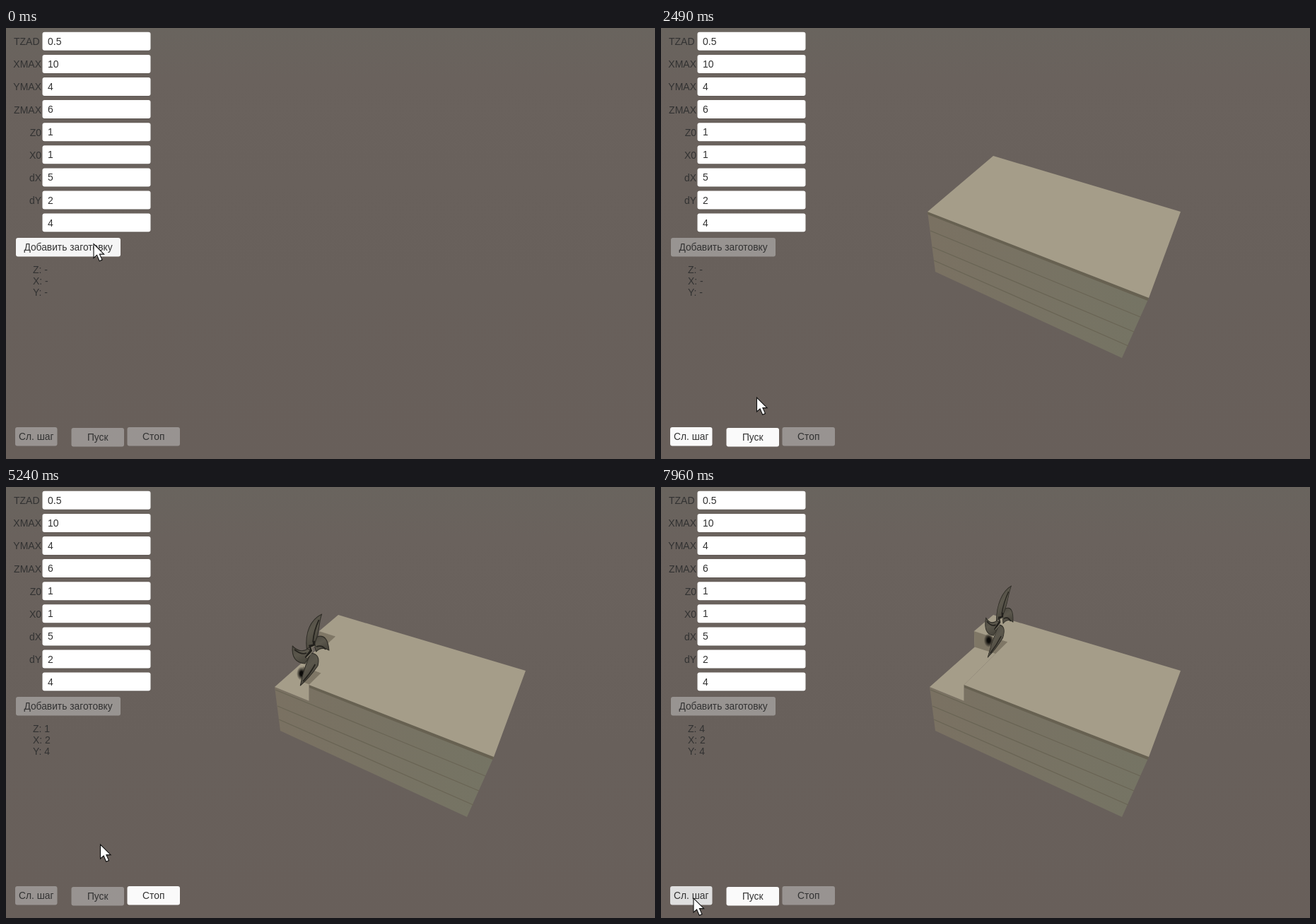
An HTML page that plays this animation: 918x610 px, repeating every 8000 ms.

```html
<!DOCTYPE html>
<html lang="ru">
<head>
<meta charset="utf-8">
<title>Обработка заготовки</title>
<style>
html, body { margin: 0; width: 100%; height: 100%; overflow: hidden; background: #68605b; }
svg { display: block; width: 100vw; height: 100vh; }
text { font: 14px "Liberation Sans", Arial, sans-serif; fill: #323232; }
</style>
</head>
<body>
<svg viewBox="0 0 918 610">
  <defs>
    <linearGradient id="sky" x2="0" y2="1">
      <stop offset="0" stop-color="#69645e"/>
      <stop offset=".12" stop-color="#6a625d"/>
      <stop offset=".6" stop-color="#68605b"/>
      <stop offset="1" stop-color="#685f5a"/>
    </linearGradient>
    <linearGradient id="side">
      <stop offset="0" stop-color="#7a7162"/>
      <stop offset="1" stop-color="#757464"/>
    </linearGradient>
    <linearGradient id="steel" x2=".5" y2="1">
      <stop offset="0" stop-color="#4b4840"/>
      <stop offset=".5" stop-color="#5b574c"/>
      <stop offset="1" stop-color="#48453c"/>
    </linearGradient>
    <radialGradient id="blot">
      <stop offset=".3" stop-color="#0c0b09"/>
      <stop offset="1" stop-color="#0c0b09" stop-opacity="0"/>
    </radialGradient>
  </defs>
  <rect width="918" height="610" fill="url(#sky)"/>
  <g id="block">
    <path id="front" fill="url(#side)"/>
    <path d="M381 287L678 409M384 310L669 430M386 329L661 450" stroke="#696454" stroke-width="1.3"/>
    <path id="strip" fill="#676151"/>
    <path id="floor" fill="#a59d89"/>
    <path id="walls" fill="#7f7766"/>
    <path id="lid" fill="#a59d89"/>
  </g>
  <ellipse id="shade" rx="7" ry="10" fill="url(#blot)"/>
  <g id="cutter" fill="none">
    <g fill="url(#steel)" stroke="#2f2d27" stroke-width="1.1" stroke-linejoin="round">
      <path d="M-6 -2C-9 -25 -2 -43 15 -51C10 -38 13 -24 5 -8Z"/>
      <path d="M5 -8L9 -19Q24 -24 27 0Q16 -6 8 2Z"/>
      <path d="M-4 -2Q-16 5 -27 -6C-28 10 -22 18 -8 19Q-2 10 2 2Z"/>
      <path d="M0 4Q15 5 11 22Q0 38 -14 50Q-11 32 -4 14Z"/>
    </g>
    <path d="M11 -43Q4 -28 3 -12M22 -1Q17 -8 8 -5M-24 -1Q-14 7 -6 4M7 20Q1 32 -10 44" stroke="#25231e" stroke-width="1.8"/>
    <path d="M-7 11L-3 5L1 0L-1 -6L5 -7L4 -13" stroke="#22201c" stroke-width="3.4"/>
    <path d="M-6 11L-1 6L3 1L1 -4L6 -6" stroke="#8a8473" stroke-width="1.2"/>
  </g>
  <g id="panel"></g>
  <path id="cursor" d="M0 0V20L4.6 16L8.2 24.3L12 22.6L8.4 14.6H14.6Z" fill="#fff" stroke="#111" stroke-width="1.1"/>
</svg>
<script>
(() => {
  const LOOP = 8000, ADDED = 1255, RUN = 3205, STOP = 6725, NEXT = 7910;
  const $ = id => document.getElementById(id);
  const set = (id, attrs) => { for (const k in attrs) $(id).setAttribute(k, attrs[k]); };
  const mix = (a, b, k) => a.map((v, i) => v + (b[i] - v) * k);
  const clamp = v => Math.max(0, Math.min(1, v));

  function add(tag, attrs, text = '') {
    const el = document.createElementNS('http://www.w3.org/2000/svg', tag);
    for (const k in attrs) el.setAttribute(k, attrs[k]);
    el.textContent = text;
    return $('panel').appendChild(el);
  }

  // Input fields
  const fields = 'TZAD 0.5,XMAX 10,YMAX 4,ZMAX 6,Z0 1,X0 1,dX 5,dY 2, 4';
  fields.split(',').forEach((field, i) => {
    const [label, value] = field.split(' '), y = 5.8 + 32.1 * i;
    add('rect', { x: 51.5, y: y + .8, width: 153, height: 26, rx: 3, fill: '#4f4945', opacity: .5 });
    add('rect', { x: 51.5, y, width: 153, height: 26, rx: 3, fill: '#fff' });
    add('text', { x: 59, y: y + 18 }, value);
    add('text', { x: i ? 50 : 47.5, y: y + 18.4, 'text-anchor': 'end' }, label);
  });

  const readout = [0, 1, 2].map(i => add('text', { x: 38, y: 347 + 16.2 * i }));

  // Buttons: grey level and opacity of each state, with a short fade between states
  const FADE = 100;
  const tint = { normal: [250, 1], hover: [245, 1], press: [200, 1], off: [200, .5] };

  function button(label, x, y, width, events) {
    const el = add('rect', { x, y, width, height: 26.5, rx: 3 });
    add('text', { x: x + width / 2, y: y + 18, 'text-anchor': 'middle', style: 'font-size:13.8px' }, label);
    return t => {
      const past = events.filter(e => e[0] <= t);
      const [since, now] = past.pop();
      const before = past.length ? past.pop()[1] : now;
      const [grey, alpha] = mix(tint[before], tint[now], clamp((t - since) / FADE));
      el.setAttribute('fill', `rgba(${grey},${grey},${grey},${alpha})`);
    };
  }

  const buttons = [
    button('Добавить заготовку', 14, 297, 148, [[0, 'hover'], [1150, 'press'], [ADDED, 'off']]),
    button('Сл. шаг', 13, 565, 59.5, [[0, 'off'], [ADDED, 'normal'], [RUN, 'off'], [STOP, 'normal'],
      [7650, 'hover'], [7800, 'press'], [NEXT, 'hover']]),
    button('Пуск', 92.5, 566, 74.5, [[0, 'off'], [ADDED, 'normal'], [2900, 'hover'], [3100, 'press'],
      [RUN, 'off'], [STOP, 'normal']]),
    button('Стоп', 171.5, 565, 74.5, [[0, 'off'], [RUN, 'normal'], [6400, 'hover'], [6620, 'press'], [STOP, 'off']])
  ];

  // Pointer moves: begin, end, target
  const moves = [
    [520, 670, 131, 315], [760, 910, 118, 316], [1860, 2150, 135, 495], [2340, 2490, 135.5, 523],
    [2490, 2970, 127, 577], [3300, 3790, 133.5, 506], [5990, 6300, 185, 583], [6300, 6480, 207.5, 573.5],
    [7270, 7700, 46, 582]
  ];
  function pointer(t) {
    return moves.reduce((pos, [begin, end, ...to]) => {
      const k = clamp((t - begin) / (end - begin));
      return mix(pos, to, k * k * (3 - 2 * k));
    }, [124, 305.5]);
  }

  // Perspective map of a 10 x 6 grid onto four corners
  function plane([[x0, y0], [x1, y1], [x2, y2], [x3, y3]]) {
    const ax = x1 - x2, bx = x3 - x2, sx = x0 - x1 + x2 - x3;
    const ay = y1 - y2, by = y3 - y2, sy = y0 - y1 + y2 - y3;
    const den = ax * by - bx * ay;
    const g = (sx * by - bx * sy) / den, h = (ax * sy - sx * ay) / den;
    return (x, z) => {
      const u = x / 10, v = z / 6, w = g * u + h * v + 1;
      return [
        ((x1 - x0 + g * x1) * u + (x3 - x0 + h * x3) * v + x0) / w,
        ((y1 - y0 + g * y1) * u + (y3 - y0 + h * y3) * v + y0) / w
      ];
    };
  }
  const high = plane([[377, 260], [690, 382], [735, 260], [470, 181]]);
  const low = plane([[380, 283], [680, 405], [726, 280], [470, 203]]);
  const poly = pts => 'M' + pts.map(p => p.map(v => v.toFixed(1)).join(' ')).join('L') + 'Z';

  // depths[i] is how far column i has been milled away
  function drawBlock(depths) {
    const n = depths.length, z0 = depths[0];
    const near = high(n, 0), far = high(10, 0);
    const notch = n ? [low(0, 0), low(n, 0)] : [];
    const edge = depths.flatMap((z, i) => [high(i, z), high(i + 1, z)]);
    const wall = (z, i) => poly([high(i, z), high(i + 1, z), low(i + 1, z), low(i, z)]);
    set('front', { d: poly([...notch, near, far, [652, 467], [388, 345]]) });
    set('strip', { d: poly([near, far, [far[0] - 1.6, far[1] + 4], [near[0] + .4, near[1] + 4]]) });
    set('floor', { d: n ? poly([...notch, near, high(n, z0), high(0, z0), low(0, z0)]) : '' });
    set('walls', { d: depths.map(wall).join('') });
    set('lid', { d: poly([far, high(10, 6), high(0, 6), ...edge, near]) });
  }

  function drawCutter(x, z) {
    const col = x - 1, k = z - 1;
    const cx = 405 + 26 * col + 15.8 * k, cy = 222 + 9 * col - 13.3 * k;
    const width = 1 - .04 * col - .078 * k, lean = -.025 * col - .032 * k;
    set('cutter', { transform: `matrix(${width} 0 ${lean} 1 ${cx} ${cy})` });
    set('shade', { transform: `translate(${cx - 13 - k * .6} ${cy + 33 - k * 2.4})` });
  }

  // One step each half second while running, four per column, one more by hand
  function stepCount(t) {
    if (t < RUN) return 0;
    return Math.floor((Math.min(t, STOP - 100) - RUN - 15) / 500) + 1 + (t >= NEXT);
  }

  const show = (id, on) => set(id, { visibility: on ? 'visible' : 'hidden' });

  function render(t) {
    const n = stepCount(t);
    const x = Math.ceil(n / 4), z = (n - 1) % 4 + 1;
    drawBlock(Array.from({ length: x }, (_, i) => i < x - 1 ? 4 : z));
    drawCutter(x, z);
    show('block', t >= ADDED);
    show('cutter', n > 0);
    show('shade', x > 1);
    [z, x, 4].forEach((v, i) => { readout[i].textContent = `${'ZXY'[i]}: ${n ? v : '-'}`; });
    buttons.forEach(paint => paint(t));
    set('cursor', { transform: `translate(${pointer(t).join(' ')})` });
  }

  const start = performance.now();
  function tick() {
    render((performance.now() - start) % LOOP);
    requestAnimationFrame(tick);
  }
  tick();
})();
</script>
</body>
</html>
```
